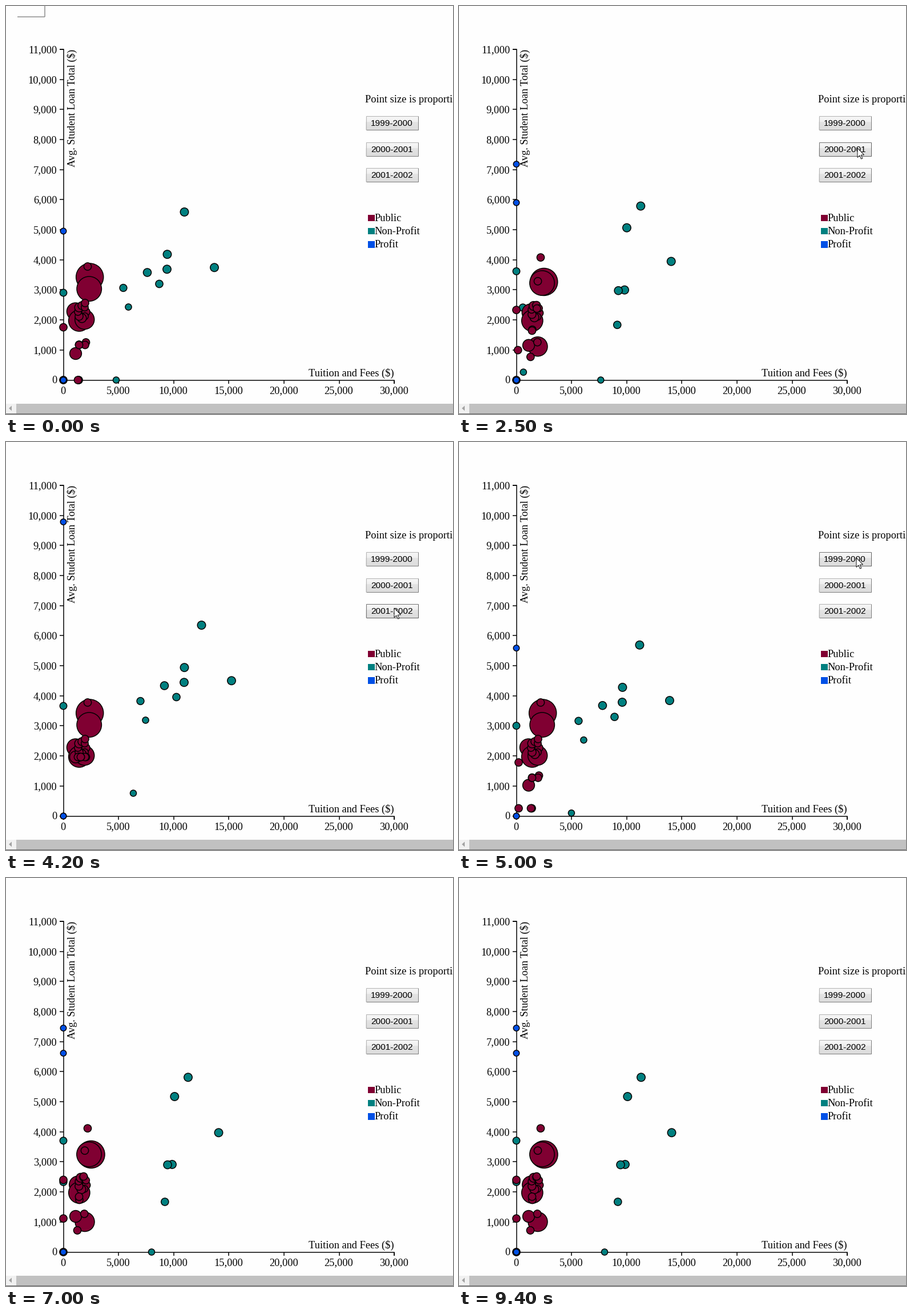
A matplotlib script for the animation above (9.6 s loop, 783 by 715 pixels).

```python
import numpy as np
import matplotlib.pyplot as plt
from matplotlib.animation import FuncAnimation
from matplotlib.patches import Circle, Polygon, Rectangle

W, H, DPI = 783, 715, 100
PT = 72 / DPI
STEP, FRAMES = 100, 96
MAROON, TEAL, BLUE = "#800032", "#008080", "#0050e6"
SERIF, SANS = "Liberation Serif", "Liberation Sans"
X0, Y0 = 100.5, 655.5
X_UNIT, Y_UNIT = 96.6, 52.68      # pixels per 5,000 and per 1,000 dollars
MOVE_MS, GLIDE_MS, PRESS_MS = 500, 200, 60

# Bubbles as x, y in the first year, then x, y in the second.
COLLEGES = np.array([
    (312.5, 361, 319, 349.3), (282.5, 435.2, 295.3, 383),
    (282, 461.3, 291, 502), (247.5, 467, 283, 502.6),
    (365, 458.3, 372.5, 446.3), (268.5, 487, 278.3, 567.5),
    (205.5, 494, X0, 532.7), (214.5, 527.5, X0, Y0),
    (193, Y0, 255, Y0), (X0, 502.5, X0, 460.3)])
LARGE = np.array([
    (146.7, 475, 149, 484.5), (145.7, 495.7, 145.5, 484.3),
    (121.7, 535.3, 126, 537.5), (128.2, 551.5, 128.3, 551.5),
    (137.7, 549.5, 138, 602.5), (122, 609, 122, 593)])
LARGE_R = [24, 21.7, 15.2, 18.6, 17, 10.4]
SMALL = np.array([
    (143, 456.5, 143, 438.7), (138.5, 520.5, 138, 477.7),
    (140, 589.5, 136, 523), (128, 593.5, 125, 617.5),
    (138.5, 594, 137.2, 588.5), (128, 594, 128.5, 564),
    (X0, 563, X0, 529), (127.5, Y0, 128, 558.5),
    (126, Y0, X0, 596.7), (X0, Y0, X0, Y0)])
PROFIT = np.array([(X0, 394.5, X0, 263), (X0, Y0, X0, 307), (X0, Y0, X0, Y0)])

# Pointer stops: arrival time, x, y
STOPS = [(800, 638, 165), (1000, 680, 165), (1500, 714, 252), (1800, 698, 249),
         (3300, 680, 291), (4500, 696, 203), (5600, 695, 246), (7000, 826, 252)]
BUTTONS = [(192, "1999-2000"), (238, "2000-2001"), (283, "2001-2002")]
BX, BW, BH = 630, 92, 25


def clump(n=8):
    """Small public schools crowded in a ring near $2,200."""
    a = 2 * np.pi * np.arange(n) / n
    first = 133 + 7 * np.cos(a), 536 + 11 * np.sin(a)
    second = 134 + 7 * np.cos(a + .3), 535 + 11 * np.sin(a + .3)
    return np.column_stack(first + second), 6.2 + np.arange(n)[::-1] % 3 * .8


def third_year(xy, kind):
    x, y = xy.T.copy()
    if kind == TEAL:
        return np.column_stack([np.where(x > X0, x + 30, x), y - 40])
    if kind == MAROON:            # the lowest catch up with the rest
        return np.column_stack([np.where(x == X0, 131, x), np.minimum(y, 552)])
    return np.column_stack([x, np.where(y < Y0, 140, y)])


RING, RING_R = clump()
college_r = np.interp(COLLEGES[:, 1], [460, 530], [7.2, 5.5])
groups = [(COLLEGES, college_r, TEAL),
          (np.vstack([LARGE, RING, SMALL]),
           np.r_[LARGE_R, RING_R, np.full(len(SMALL), 6.6)], MAROON),
          (PROFIT, np.full(len(PROFIT), 5.2), BLUE)]
YEAR_1 = np.vstack([g[:, :2] for g, _, _ in groups])
YEAR_2 = np.vstack([g[:, 2:] for g, _, _ in groups])
YEAR_3 = np.vstack([third_year(g[:, :2], kind) for g, _, kind in groups])
RADII = np.concatenate([r for _, r, _ in groups])
COLORS = [kind for g, _, kind in groups for _ in g]
MOVES = [(2150, YEAR_1, YEAR_2), (3460, YEAR_2, YEAR_3),
         (4660, YEAR_3, YEAR_1), (5860, YEAR_1, YEAR_2)]

fig = plt.figure(figsize=(W / DPI, H / DPI), dpi=DPI, facecolor="#fefefe")
ax = fig.add_axes([0, 0, 1, 1])


def text(x, y, s, size=18.4, font=SERIF, **kw):
    return ax.text(x, y, s, fontsize=size * PT, family=font, color="black",
                   va="baseline", zorder=6, **kw)


def line(xs, ys, color="black", width=1.5, **kw):
    return ax.plot(xs, ys, color=color, lw=width * PT,
                   solid_capstyle="butt", solid_joinstyle="miter", **kw)[0]


def box(x, y, w, h, color, **kw):
    return ax.add_patch(Rectangle((x, y), w, h, fc=color, ec="none", **kw))


def draw_axes():
    line([93.6, X0, X0, 93.6], [76, 76, Y0, Y0], zorder=2)
    line([X0, X0, 680.3, 680.3], [662.4, Y0, Y0, 662.4], zorder=2)
    for k in range(12):
        y = Y0 - k * Y_UNIT
        line([93.6, X0], [y, y], zorder=2)
        text(89.3, y + 5.9, f"{k * 1000:,}", ha="right")
    for k in range(7):
        x = X0 + k * X_UNIT
        line([x, x], [Y0, 662.4], zorder=2)
        text(x - .6, 679.5, f"{k * 5000:,}", ha="center")
    text(680, 648.6, "Tuition and Fees ($)", ha="right")
    text(120.5, 76, "Avg. Student Loan Total ($)", ha="right",
         rotation=90, rotation_mode="anchor")


def draw_page():
    text(629, 169.3, "Point size is proportional")
    rows = [("Public", MAROON), ("Non-Profit", TEAL), ("Profit", BLUE)]
    for k, (name, color) in enumerate(rows):
        y = 365.5 + 23.2 * k
        box(634, y, 12, 11.7, color)
        text(645.3, y + 11.5, name)
    box(0, 697, W, 16.5, "#f1f1f1")
    box(18, 697, W - 18, 16.5, "#c1c1c1")
    box(0, 713.7, W, 1.3, "#707070")
    ax.add_patch(Polygon([(5, 705), (10, 700.5), (10, 709.5)], fc="#a3a3a3"))


def shade(top, above, below, bottom):
    """Two stacked grey ramps, as on a glossy button."""
    levels = np.r_[np.linspace(top, above, 11), np.linspace(below, bottom, 14)]
    return np.repeat(levels[:, None, None] / 255, 3, axis=2)


UP = shade(248, 240, 228, 220)
DOWN = shade(204, 224, 230, 250)


class Button:
    def __init__(self, top, label):
        self.top = top
        self.face = ax.imshow(UP, extent=(BX, BX + BW, top + BH, top),
                              aspect="auto", interpolation="nearest", zorder=3)
        l, r, t, b = BX + .5, BX + BW - .5, top + .5, top + BH - .5
        self.upper = line([l, l, r], [b, t, t], width=1, zorder=4)
        self.lower = line([l, r, r], [b, b, t], width=1, zorder=4)
        text(BX + BW / 2 - .4, top + 17.7, label, 15.33, SANS, ha="center")

    def contains(self, x, y):
        return BX <= x <= BX + BW and self.top <= y <= self.top + BH

    def show(self, hover, pressed):
        self.face.set_data(DOWN if pressed else UP)
        self.upper.set_color("#777777" if hover else "#b5b5b5")
        lower = "#bdbdbd" if pressed else "#606060" if hover else "#7d7d7d"
        self.lower.set_color(lower)


def ease(k):
    k = min(max(k, 0), 1)
    return 4 * k ** 3 if k < .5 else 1 - 4 * (1 - k) ** 3


def bubbles_at(t):
    state = YEAR_1
    for start, old, new in MOVES:
        if t >= start:
            state = old + (new - old) * ease((t - start) / MOVE_MS)
    return state


def pointer_at(t):
    pos = np.array([711., 166.])
    for arrival, x, y in STOPS:
        pos += ((x, y) - pos) * ease(1 - (arrival - t) / GLIDE_MS)
    return pos


draw_axes()
draw_page()
buttons = [Button(*b) for b in BUTTONS]
bubbles = [ax.add_patch(Circle(xy, r, fc=c, ec="black", lw=1.5 * PT, zorder=5))
           for xy, r, c in zip(YEAR_1, RADII, COLORS)]
corner = [line([20, 68], [18.5, 18.5], "#8c8c8c"),
          line([68.3, 68.3], [0, 19.2], "#8c8c8c")]

ARROW = np.array([(0, 0), (0, 16.5), (3.8, 13), (6.4, 19), (8.8, 18),
                  (6.2, 12.2), (11.5, 11.8)])
BEAM = np.array([(-3, -8), (3, -8), (0, -8), (0, 8), (-3, 8), (3, 8)])
arrow = ax.add_patch(Polygon(ARROW, fc="white", ec="black", lw=.9 * PT, zorder=8))
beam = line([0], [0], width=1, zorder=8)

ax.set_xlim(0, W)
ax.set_ylim(H, 0)
ax.axis("off")


def draw(n):
    t = n * STEP
    for patch, xy in zip(bubbles, bubbles_at(t)):
        patch.center = xy

    pos = pointer_at(t)
    arrow.set_xy(ARROW + pos)
    arrow.set_visible(1400 <= t < 7000)
    beam.set_data(*(BEAM + pos).T)
    beam.set_visible(700 <= t < 1400)

    clicking = any(abs(t - start) <= PRESS_MS for start, _, _ in MOVES)
    for button in buttons:
        hover = 1700 <= t < 7000 and button.contains(*pos)
        button.show(hover, hover and clicking)
    for part in corner:
        part.set_alpha(max(0, 1 - t / 600))
    return bubbles


anim = FuncAnimation(fig, draw, frames=FRAMES, interval=STEP,
                     repeat=True, repeat_delay=0, blit=False)
plt.show()
```
